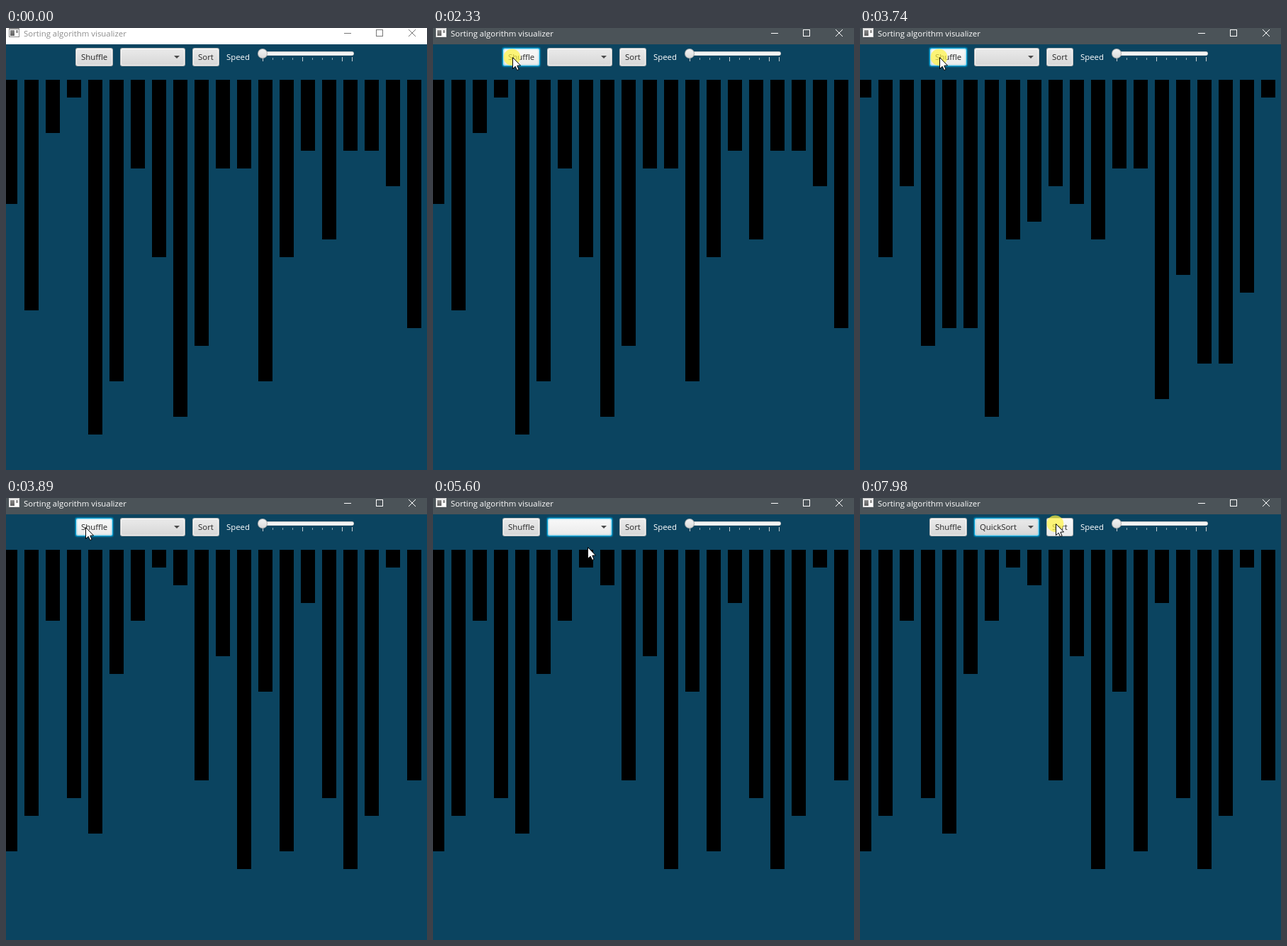
These frames come from a looping animation (594 px wide and 623 px high, 8000 ms). An HTML page with a canvas:

```html
<!DOCTYPE html>
<html lang="en">
<head>
<meta charset="utf-8">
<title>Sorting algorithm visualizer</title>
<style>
  html, body { margin: 0; width: 100%; height: 100%; overflow: hidden; background: #0b4460; }
  canvas { display: block; width: 594px; height: 623px; }
</style>
</head>
<body>
<canvas id="stage" width="594" height="623"></canvas>
<script>
const ctx = document.getElementById("stage").getContext("2d");
const LOOP = 8000;
const STEP = 80;   // time between two pointer positions
const HOLD = 150;  // how long the mouse button stays down
const FONT = "'Open Sans', 'Noto Sans', sans-serif";

// Bar heights in units of 25 px, before and after each shuffle.
const shuffles = [
  [7, 13, 3, 1, 20, 17, 5, 10, 19, 15, 5, 5, 17, 10, 4, 9, 4, 4, 6, 14],
  [1, 10, 6, 15, 14, 14, 19, 9, 8, 6, 7, 9, 5, 5, 18, 11, 16, 16, 12, 1],
  [17, 15, 4, 14, 16, 7, 4, 1, 2, 13, 6, 18, 8, 17, 3, 14, 18, 15, 1, 13],
];

const click = { shuffle: 2260, again: 3740, combo: 4980, item: 6910, sort: 7980 };
const MENU_OPENS = 5840;

const stops = [
  { at: 460, x: 572, y: 615, steps: 2 },
  { at: 900, x: 112, y: 217, steps: 3 },
  { at: 1290, x: 31, y: 21 },
  { at: 1850, x: 76, y: 31, steps: 1 },
  { at: 1940, x: 112, y: 41, steps: 4 },
  { at: 4360, x: 209, y: 43 },
  { at: 5280, x: 218, y: 69 },
  { at: 5680, x: 246, y: 38 },
  { at: 6350, x: 227, y: 66 },
  { at: 7440, x: 276, y: 36 },
];

const within = (v, a, b) => v >= a && v < b;
const easeOut = p => 1 - (1 - p) ** 1.7;

function pointerAt(t) {
  const pos = { x: 594, y: 623 };
  for (const { at, x, y, steps = 5 } of stops) {
    if (t < at) break;
    const taken = Math.min(steps, Math.floor((t - at) / STEP) + 1);
    const p = easeOut(taken / steps);
    pos.x += (x - pos.x) * p;
    pos.y += (y - pos.y) * p;
  }
  return { x: Math.round(pos.x), y: Math.round(pos.y) };
}

function rect(x, y, w, h, color) {
  ctx.fillStyle = color;
  ctx.fillRect(x, y, w, h);
}

function disc(x, y, r, fill) {
  ctx.beginPath();
  ctx.arc(x, y, r, 0, Math.PI * 2);
  ctx.fillStyle = fill;
  ctx.fill();
}

function line(x1, y1, x2, y2) {
  ctx.beginPath();
  ctx.moveTo(x1, y1);
  ctx.lineTo(x2, y2);
  ctx.stroke();
}

function poly(points, fill) {
  ctx.beginPath();
  points.forEach(([x, y]) => ctx.lineTo(x, y));
  ctx.closePath();
  ctx.fillStyle = fill;
  ctx.fill();
}

function shade(y, h, top, bottom) {
  const g = ctx.createLinearGradient(0, y, 0, y + h);
  g.addColorStop(0, top);
  g.addColorStop(1, bottom);
  return g;
}

function text(str, x, y, color) {
  ctx.font = `11.4px ${FONT}`;
  ctx.fillStyle = color;
  ctx.fillText(str, x, y);
}

function drawTitleBar(active) {
  rect(0, 0, 594, 23, active ? "#4b5358" : "#fff");
  rect(4, 0, 15, 13, active ? "#d4d4d4" : "#8c8c8c");
  rect(5, 2, 13, 10, "#fff");
  rect(6, 3, 6, 8, shade(3, 8, "#8a8a8a", "#5f5f5f"));
  rect(14, 3, 3, 4, "#9a9a9a");
  text("Sorting algorithm visualizer", 25, 12, active ? "#fff" : "#8c8c8c");

  ctx.strokeStyle = active ? "#fff" : "#777";
  ctx.lineWidth = 1;
  line(477, 7.5, 487, 7.5);
  ctx.strokeRect(522.5, 2.5, 9, 9);
  line(568, 2, 578, 12);
  line(578, 2, 568, 12);
}

function drawButton(x, w, label, { focus, hover }) {
  const y = 28, h = 26;
  const layer = (inset, fill) => {
    ctx.beginPath();
    ctx.roundRect(x + inset, y + inset, w - 2 * inset, h - 2 * inset, 3 - inset / 2);
    ctx.fillStyle = fill;
    ctx.fill();
  };
  const body = hover ? shade(y, h, "#fafafa", "#e9e9e9") : shade(y, h, "#ebebeb", "#d6d6d6");
  layer(focus ? -0.2 : 0, focus ? "#039ed3" : "#b5b5b5");
  layer(1, shade(y, h, "#fff", "#efefef"));
  layer(2, body);
  if (focus) {
    layer(-1.4, "rgba(3,158,211,.25)");
    layer(2.6, body);
  }
  text(label, x + 8, 45, "#262626");
}

function drawSlider() {
  const track = (inset, fill) => {
    ctx.beginPath();
    ctx.roundRect(357 + inset, 33 + inset, 134 - 2 * inset, 6 - 2 * inset, 3 - inset);
    ctx.fillStyle = fill;
    ctx.fill();
  };
  track(0, "#c4c4c4");
  track(0.7, shade(33, 6, "#e9e9e9", "#fff"));
  for (let i = 0; i < 10; i++) {
    const major = i % 4 === 0 || i === 9;
    rect(362 + i * 14, major ? 41 : 42, 1, major ? 6 : 3, major ? "#c5cdd1" : "#8fa5b1");
  }
  disc(362, 36, 7, "#b0b0b0");
  disc(362, 36, 6, shade(30, 12, "#f3f3f3", "#dcdcdc"));
}

function drawMenu(highlight) {
  ctx.save();
  ctx.shadowColor = "rgba(0,0,0,.2)";
  ctx.shadowBlur = 12;
  ctx.shadowOffsetY = 4;
  rect(163, 53, 92, 58, "#c4c4c4");
  ctx.restore();
  rect(164, 54, 90, 56, "#fff");
  if (highlight) rect(164, 57, 90, 25, "#0096c9");
  text("QuickSort", 184, 74, highlight ? "#fff" : "#262626");
  text("BubbleSort", 184, 99, "#262626");
}

function drawPointer({ x, y }) {
  ctx.save();
  ctx.translate(x + 0.5, y + 0.5);
  ctx.lineWidth = 1;
  ctx.lineJoin = "round";
  ctx.strokeStyle = "#000";
  poly([[0, 0], [0, 16], [3.7, 12.7], [6.2, 18], [8.6, 17], [6.3, 11.6], [11, 11.4]], "#fff");
  ctx.stroke();
  ctx.restore();
}

function draw(t) {
  const pointer = pointerAt(t);
  const over = (x, w) => within(pointer.x, x, x + w) && within(pointer.y, 28, 54);
  const released = click.item + HOLD;
  const menuOpen = within(t, MENU_OPENS, released);

  rect(0, 0, 594, 623, "#0b4460");
  drawTitleBar(t >= click.shuffle);

  const round = [click.shuffle, click.again].filter(c => t >= c + HOLD).length;
  shuffles[round].forEach((units, i) => rect(30 * i - 4, 73, 20, units * 25, "#000"));

  drawButton(98, 53, "Shuffle", {
    focus: within(t, click.shuffle, click.combo),
    hover: over(98, 53),
  });
  drawButton(161, 92, t >= released ? "QuickSort" : "", {
    focus: t >= click.combo,
    hover: !menuOpen && (over(161, 92) || within(t, click.combo, MENU_OPENS)),
  });
  poly([[237, 39], [245, 39], [241, 43]], "#4a4a4a");
  drawButton(263, 38, "Sort", { focus: false, hover: over(263, 38) });
  text("Speed", 311, 45, "#fff");
  drawSlider();

  if (menuOpen) drawMenu(within(pointer.y, 57, 82));

  if (Object.values(click).some(c => within(t, c, c + HOLD))) {
    disc(pointer.x - 0.5, pointer.y + 0.2, 11.8, "rgba(255,243,65,.7)");
  }
  if (t >= stops[0].at) drawPointer(pointer);
}

function tick() {
  draw(performance.now() % LOOP);
  requestAnimationFrame(tick);
}
tick();
</script>
</body>
</html>
```
